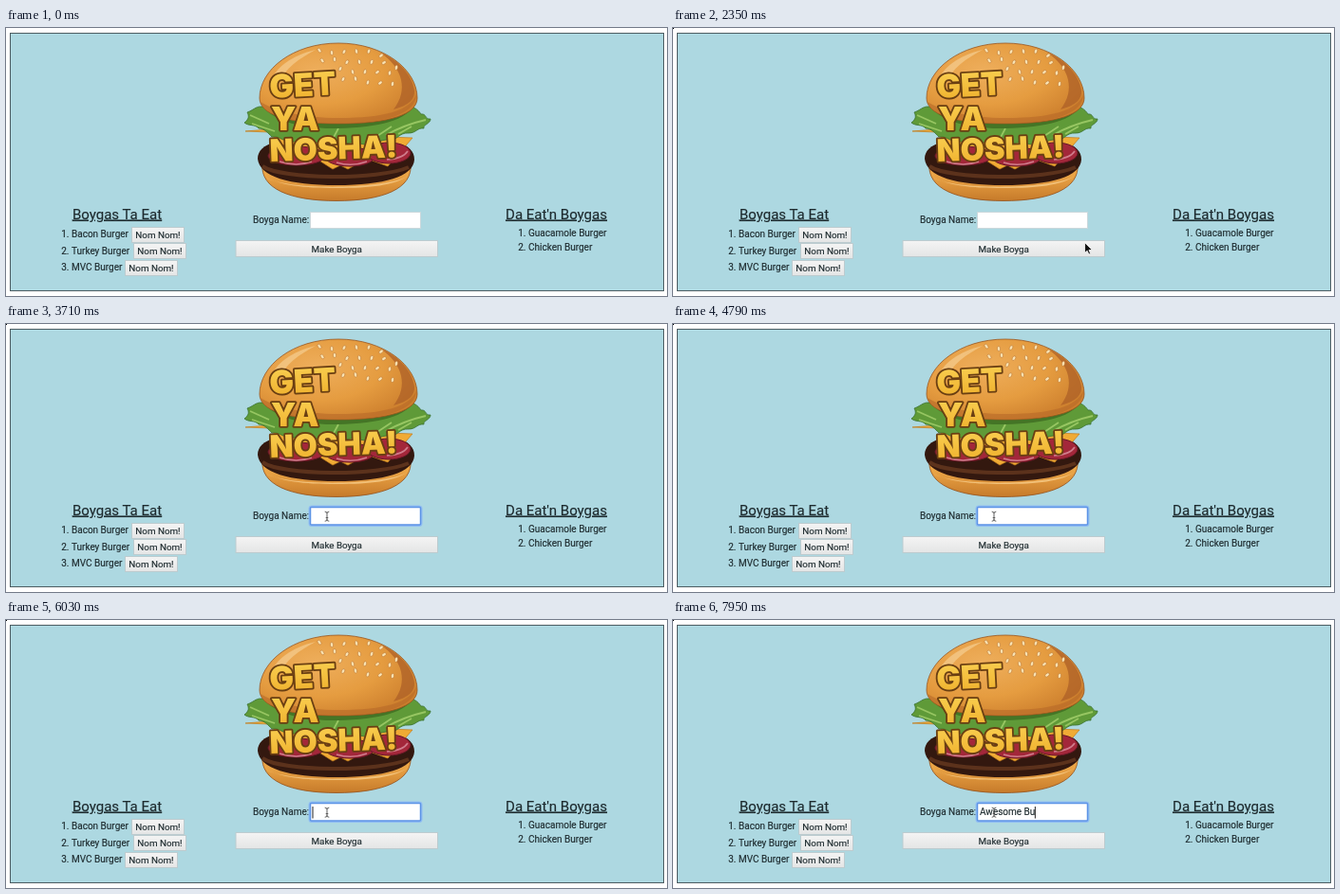
These frames come from a looping animation (696x283 px, 8 s). An HTML page:

```html
<!DOCTYPE html>
<html lang="en">
<head>
<meta charset="utf-8">
<title>Burger list</title>
<style>
  html, body { margin: 0; width: 100%; height: 100%; overflow: hidden; background: #fff; }
  svg { display: block; width: 100vw; height: 100vh; }
  text {
    font-family: Roboto, "Open Sans", sans-serif; font-size: 10px;
    fill: #1d2a2e; stroke: #1d2a2e; stroke-width: .15; white-space: pre;
  }
  .head { font-size: 15px; text-anchor: middle; text-decoration: underline; }
  .mid { font-size: 9.8px; text-anchor: middle; }
  .end { text-anchor: end; }
  .title text {
    font: 900 34px Inter, "Open Sans", sans-serif; fill: url(#gold);
    stroke: #6a3f12; stroke-width: 3.6; stroke-linejoin: round; paint-order: stroke;
  }
</style>
</head>
<body>
<svg id="stage" viewBox="0 0 696 283" preserveAspectRatio="none">
  <defs>
    <radialGradient id="bun" cx=".36" cy=".35" r=".75">
      <stop offset="0" stop-color="#eeae5c"/>
      <stop offset=".55" stop-color="#e59c40"/>
      <stop offset="1" stop-color="#cb7d2c"/>
    </radialGradient>
    <linearGradient id="base" x2="0" y2="1">
      <stop offset=".3" stop-color="#eba546"/>
      <stop offset="1" stop-color="#c67a2a"/>
    </linearGradient>
    <linearGradient id="gold" x2="0" y2="1">
      <stop offset=".2" stop-color="#f8cb4c"/>
      <stop offset="1" stop-color="#eeae2a"/>
    </linearGradient>
    <linearGradient id="button" x2="0" y2="1">
      <stop offset="0" stop-color="#f4f4f4"/>
      <stop offset="1" stop-color="#e4e5e5"/>
    </linearGradient>
  </defs>

  <rect width="696" height="283" fill="#fff"/>
  <rect x="4.5" y="5.5" width="688" height="272" fill="#add8e1" stroke="#4c5c61"/>
  <rect id="dot" width="1" height="1"/>

  <g id="burger">
    <path d="M270 143C267 170 300 182.500 348 182.500S429 170 426 143Z" fill="url(#base)" stroke="#94501a" stroke-width=".8"/>
    <path d="M274 158C294 171 395 171 422 157C408 166 384 169 348 169S290 166 274 158Z" fill="#f3c27a"/>
    <path d="M265 138C265 122 288 114 348 114S430 122 430 139C429 157 398 166 348 166S267 157 265 138Z" fill="#33180f"/>
    <path d="M270 146C290 160 392 161 424 147" fill="none" stroke="#5c321c" stroke-width="4"/>
    <path d="M252 109L277 107L288 125L300 121L344 149L352 145L360 149L380 138L402 146L428 116Z" fill="#f0ab35" stroke="#c07a1c" stroke-width=".7"/>
    <g fill="#a3273a" stroke="#681827">
      <ellipse cx="306" cy="135" rx="30" ry="10"/>
      <ellipse cx="362" cy="136" rx="26" ry="10"/>
      <ellipse cx="403" cy="132" rx="23" ry="11"/>
    </g>
    <path d="M288 141Q306 147 322 141M348 142Q364 147 380 141M401 139Q418 138 423 130" fill="none" stroke="#d07c8c" stroke-width="1.500"/>
    <path d="M268 83C263 83 260 87 254 89C256 93 256 96 251 100C256 104 262 101 266 106C272 106 276 111 280 115
      C288 113 293 122 304 120C315 128 326 117 338 122C350 127 360 118 372 122C386 126 393 117 404 118
      C412 119 414 110 424 111C432 111 433 105 440 106C439 102 447 101 447 96
      C441 97 443 90 437 91C434 86 428 82 422 82Z" fill="#5f9a38" stroke="#3a7230" stroke-width=".8"/>
    <path d="M257 92L277 101M259 101L283 109M400 113Q420 102 442 97M413 112L427 104M385 118L406 104M342 121L350 106"
      fill="none" stroke="#97c662" stroke-width="1.800"/>
    <path d="M269 80C279 97 308 107 350 106S423 98 431 79Z" fill="#39651f" opacity=".7"/>
    <path d="M267 74C267 44 302 16 350 16S433 44 433 74C433 91 405 101 350 101S267 91 267 74Z" fill="url(#bun)" stroke="#99551f" stroke-width=".8"/>
    <path d="M432 70C426 87 399 95 350 95C315 95 283 88 268 78C272 93 302 101 350 101S432 91 432 70Z" fill="#b76a29" opacity=".6"/>
    <path d="M278 58C283 42 301 29 326 23C309 32 293 43 288 58Z" fill="#f4cb8c" opacity=".75"/>
    <path d="M394 26C418 42 424 66 408 86C424 82 431 75 430 66C428 50 414 34 394 26Z" fill="#ae6127" opacity=".75"/>
    <g id="seeds"></g>
    <g class="title">
      <text x="278" y="74" transform="rotate(-3 278 74)">GET</text>
      <text x="279" y="108">YA</text>
      <text x="278" y="141" transform="rotate(-2 278 141)" style="font-size:32.5px">NOSHA!</text>
    </g>
  </g>

  <g id="page"></g>

  <g id="ring">
    <rect x="319.5" y="192.5" width="118" height="20.500" rx="2.5" fill="none" stroke="#8fbcf2" stroke-width="2"/>
    <rect x="320.5" y="193.5" width="116" height="18.500" rx="1" fill="#fff" stroke="#5d94e6" stroke-width="1.5"/>
  </g>
  <text id="typed" x="323" y="206"></text>
  <rect id="caret" y="197" width="1" height="12.5" fill="#222"/>
  <path id="arrow" d="M0 0V10.8L2.6 8.5L4.3 12.4L6.1 11.6L4.4 7.8H8Z" fill="#111" stroke="#fff" stroke-width=".8"/>
  <path id="beam" d="M-2.3-4.8Q0-4.8 0-3.2Q0-4.8 2.3-4.8M0-3.5V4M-2.3 5.2Q0 5.2 0 3.6Q0 5.2 2.3 5.2M-1.3 1.6H1.3" fill="none" stroke="#444" stroke-width=".85"/>
</svg>

<script>
const LOOP = 8000;
const byId = id => document.getElementById(id);

function add(parent, tag, attrs, content = "") {
  const el = document.createElementNS("http://www.w3.org/2000/svg", tag);
  for (const key in attrs) el.setAttribute(key, attrs[key]);
  el.textContent = content;
  return parent.appendChild(el);
}

const page = byId("page");
const label = (x, y, content, cls = "") => add(page, "text", { x, y, class: cls }, content);

function button(x, y, width, height, content) {
  add(page, "rect", { x: x + .5, y: y + .5, width, height, fill: "url(#button)", stroke: "#bccbcf" });
  label(x + width / 2 + .5, y + height / 2 + 4, content, "mid");
}

function listItem(x, y, n, name) {
  label(x - 2.5, y, n + ".", "end");
  label(x, y, name);
}

label(117, 201.5, "Boygas Ta Eat", "head");
label(579.5, 201.5, "Da Eat'n Boygas", "head");
[["Bacon Burger", 132], ["Turkey Burger", 134], ["MVC Burger", 125]].forEach(([name, x], i) => {
  const y = 210 + i * 17.4;
  listItem(69, y + 11.3, i + 1, name);
  button(x, Math.round(y), 55, 16, "Nom Nom!");
});
["Guacamole Burger", "Chicken Burger"].forEach((name, i) => listItem(550, 220 + i * 14.6, i + 1, name));
label(260, 206, "Boyga Name:");
add(page, "rect", { x: 320.5, y: 194.5, width: 116, height: 17, fill: "#fff", stroke: "#cbd8dc" });
button(241.5, 224, 212.5, 17, "Make Boyga");

// Sesame seeds in staggered rows that follow the dome.
for (let row = 0; row < 4; row++) {
  for (let col = 0; col < 6 + row; col++) {
    const x = 330 - row * 2 + col * 13 + (row % 2) * 5;
    const y = 23 + row * 10 + ((x - 350) / 22) ** 2 * .75 + (col * 7 + row * 5) % 4;
    if (x > 412 || (row > 1 && x < 352)) continue;
    add(byId("seeds"), "ellipse", {
      cx: x, cy: y, rx: 1.6, ry: 2.6, fill: "#f9e2b1", stroke: "#b87331", "stroke-width": .5,
      transform: `rotate(${(x - 350) * .6 + (col % 3 - 1) * 25} ${x} ${y})`
    });
  }
}

const TEXT = "Awesome Bu";
const KEYS = [[6190, 1], [6520, 2], [6680, 3], [6990, 4], [7300, 6], [7470, 8], [7790, 9], [7950, 10]];
const BLINKS = [3400, 3710, 4180, 4640, 5100, 5560, 6030];

const show = (id, on) => byId(id).setAttribute("visibility", on ? "visible" : "hidden");

function drawPointer(t) {
  const step = Math.min(6, Math.floor((t - 2030) / 153));
  const p = Math.max(0, step) / 6;
  const ease = p * p * (3 - 2 * p);
  const x = 467 + (338 - 467) * ease;
  const y = 235 + (203 - 235) * ease;
  const inField = x < 437 && y < 212;
  show("arrow", t >= 2030 && !inField);
  show("beam", t >= 2030 && inField);
  for (const id of ["arrow", "beam"]) byId(id).setAttribute("transform", `translate(${x} ${y})`);
}

function drawField(t) {
  const key = KEYS.filter(([at]) => t >= at).pop();
  const typed = byId("typed");
  typed.textContent = key ? TEXT.slice(0, key[1]) : "";
  const width = key ? typed.getComputedTextLength() : 0;
  byId("caret").setAttribute("x", 322.5 + width);
  show("caret", BLINKS.filter(at => t >= at).length % 2 === 1);
  show("ring", t >= 3240);
  byId("ring").setAttribute("opacity", t < 3400 ? .5 : 1);
}

function draw(t) {
  show("dot", t >= 1400);
  drawPointer(t);
  drawField(t);
}

const start = performance.now();
function tick() {
  draw((performance.now() - start) % LOOP);
  requestAnimationFrame(tick);
}
tick();
</script>
</body>
</html>
```
